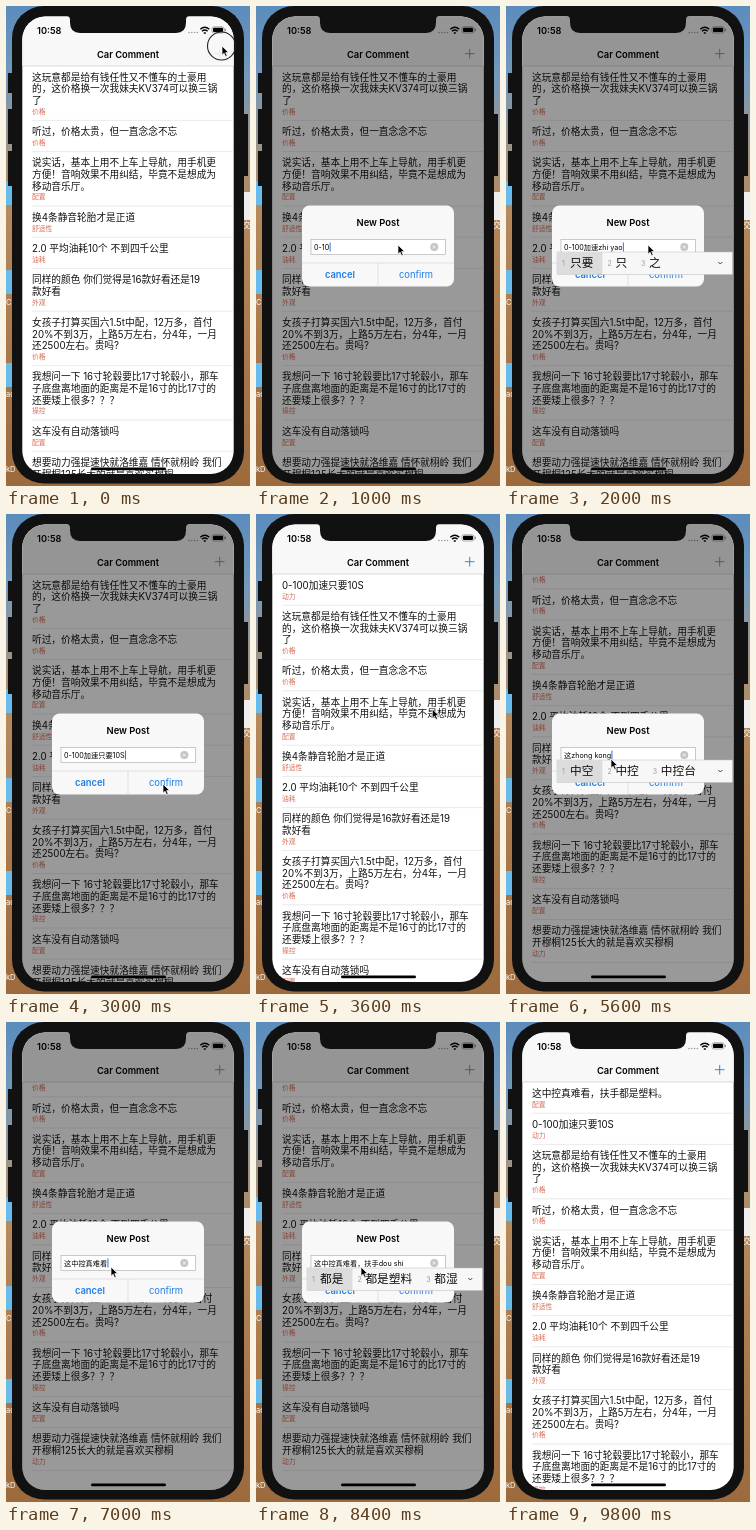
An HTML page that plays this animation: 244x480 px, repeating every 10 s.

```html
<!DOCTYPE html>
<html lang="zh-CN">
<head>
<meta charset="utf-8">
<title>Car Comment</title>
<style>
html, body { margin: 0; width: 100%; height: 100%; overflow: hidden; background: #000; }
svg { display: block; width: 100vw; height: 100vh; }
text { font-family: Inter, "Noto Sans CJK SC", "Noto Sans CJK", sans-serif; white-space: pre; }
</style>
</head>
<body>
<svg viewBox="0 0 244 480">
  <defs>
    <linearGradient id="desert" x2="0" y2="1">
      <stop offset="0" stop-color="#5b8cbc"/>
      <stop offset=".15" stop-color="#7499bb"/>
      <stop offset=".28" stop-color="#9a948c"/>
      <stop offset=".42" stop-color="#b58a5e"/>
      <stop offset=".7" stop-color="#ab7a4a"/>
      <stop offset="1" stop-color="#9c6a3c"/>
    </linearGradient>
    <clipPath id="screen"><rect x="16.3" y="10.5" width="211.4" height="457.5" rx="23"/></clipPath>
    <clipPath id="table"><rect x="16" y="60" width="212" height="409"/></clipPath>
  </defs>

  <!-- desktop -->
  <rect width="244" height="480" fill="url(#desert)"/>
  <g fill="#68bbea">
    <rect x="-8" y="175" width="15" height="24" rx="2"/>
    <rect x="-8" y="264" width="15" height="24" rx="2"/>
    <rect x="-8" y="357" width="15" height="24" rx="2"/>
  </g>
  <rect x="235" y="186" width="12" height="28" fill="#eee"/>
  <g fill="#fff" font-size="7.5">
    <text x="0" y="299">C</text><text x="0" y="391">ad</text>
    <text x="0" y="466">kD</text><text x="237" y="222">交</text>
  </g>

  <!-- phone -->
  <g fill="#121112">
    <path d="M2 67h6v20h-6zM2 103h6v35h-6zM2 145h6v35h-6zM236 108h6v62h-6z"/>
    <rect x="6" y="0" width="232" height="477.5" rx="32"/>
  </g>
  <g clip-path="url(#screen)">
    <rect x="16" y="10" width="212" height="459" fill="#fff"/>
    <g clip-path="url(#table)"><g id="rows"></g></g>
    <rect x="16" y="10" width="212" height="50" fill="#f8f8f8"/>
    <path d="M16 60h212" stroke="#b5b5b8" stroke-width=".5"/>
    <text x="122" y="51.5" font-size="9.3" font-weight="600" text-anchor="middle">Car Comment</text>
    <path id="plus" d="M208.9 47.7h9.6M213.7 42.9v9.6" stroke-width=".9"/>
    <text x="31" y="27.5" font-size="9.2" font-weight="600">10:58</text>
    <g fill="#999">
      <circle cx="183" cy="26.5" r=".8"/><circle cx="185.8" cy="26.5" r=".8"/>
      <circle cx="188.6" cy="26.5" r=".8"/><circle cx="191.4" cy="26.5" r=".8"/>
    </g>
    <path d="M194.3 23.2q4.5-4 9 0M196 25.2q2.8-2.4 5.6 0M197.8 27h2" fill="none" stroke="#000" stroke-width="1.4"/>
    <rect x="206" y="20.8" width="12" height="6.2" rx="1.8" fill="none" stroke="#777" stroke-width=".6"/>
    <rect x="207" y="21.8" width="10" height="4.2" rx="1"/>
    <path d="M219.2 22.7v2.4" stroke="#777"/>
    <rect x="85" y="461.5" width="75" height="2.8" rx="1.4"/>
    <rect id="dim" x="16" y="10" width="212" height="459"/>
  </g>
  <path d="M60.5 10q3.5 0 3.5 4v2.5q0 10.5 10 10.5h96q10 0 10-10.5v-2.5q0-4 3.5-4z" fill="#121112"/>

  <!-- alert -->
  <g id="alert">
    <rect x="46" y="199.5" width="152" height="81" rx="7.5" fill="#f8f8f8"/>
    <text x="122" y="219.5" font-size="9.4" font-weight="600" text-anchor="middle">New Post</text>
    <rect x="55" y="233.5" width="134.5" height="15" fill="#fff" stroke="#b4b4b4" stroke-width=".7"/>
    <text id="entry" x="58" y="243.6" font-size="7.2"></text>
    <path id="caret" stroke="#2f6fe8" stroke-width="1"/>
    <g id="clear">
      <circle cx="178.3" cy="241" r="4" fill="#c4c4c7"/>
      <path d="M176.8 239.5l3 3m0-3l-3 3" stroke="#fff" stroke-width=".8"/>
    </g>
    <path d="M46 257h152M122 257v23.5" stroke="#d2d2d5" stroke-width=".6"/>
    <g font-size="9.4" fill="#1b7de8" text-anchor="middle">
      <text x="84" y="271.5" font-weight="600">cancel</text>
      <text x="160" y="271.5">confirm</text>
    </g>
  </g>
  <g id="candidates"></g>

  <g id="pointer">
    <circle id="press" cx="-.5" cy="0" r="14" fill="none" stroke="#222" stroke-width="1.1"/>
    <path d="M0 0v9.2l2.1-2 1.5 3.4 1.6-.7-1.5-3.3h2.9z" stroke="#fff" stroke-width=".7"/>
  </g>
</svg>
<script>
const LOOP = 10000, STEP = 200, TABLE_TOP = 60, LINE = 11.6;
const $ = id => document.getElementById(id);

const comments = [
  ['价格', '这玩意都是给有钱任性又不懂车的土豪用', '的，这价格换一次我妹夫KV374可以换三锅', '了'],
  ['价格', '听过，价格太贵，但一直念念不忘'],
  ['配置', '说实话，基本上用不上车上导航，用手机更', '方便！音响效果不用纠结，毕竟不是想成为', '移动音乐厅。'],
  ['舒适性', '换4条静音轮胎才是正道'],
  ['油耗', '2.0 平均油耗10个 不到四千公里'],
  ['外观', '同样的颜色 你们觉得是16款好看还是19', '款好看'],
  ['价格', '女孩子打算买国六1.5t中配，12万多，首付', '20%不到3万，上路5万左右，分4年，一月', '还2500左右。贵吗?'],
  ['操控', '我想问一下 16寸轮毂要比17寸轮毂小，那车', '子底盘离地面的距离是不是16寸的比17寸的', '还要矮上很多？？？'],
  ['配置', '这车没有自动落锁吗'],
  ['动力', '想要动力强提速快就洛维嘉 情怀就栩岭 我们', '开穆桐125长大的就是喜欢买穆桐']
];
const posts = [
  { at: 3600, row: ['动力', '0-100加速只要10S'] },
  { at: 9400, row: ['配置', '这中控真难看，扶手都是塑料。'] }
];

// [time, field text, input-method candidates]
const typing = [
  [0, ''], [600, '0'], [800, '0-1'], [1000, '0-10'], [1200, '0-100'],
  [1400, '0-100jia', '加 家 价'], [1600, '0-100jia su', '加速 家 价'], [1800, '0-100加速'],
  [2000, '0-100加速zhi yao', '只要 只 之'], [2200, '0-100加速只要'],
  [2400, '0-100加速只要1'], [2600, '0-100加速只要10S'],
  [3600, ''], [4800, 'zhe', '这 着 者'], [5000, '这'], [5200, '这zhong', '中 种 重'],
  [5400, '这zhong ko', '中空 中控 中'], [5600, '这zhong kong', '中空 中控 中控台'],
  [6000, '这中控'], [6200, '这中控zhen', '真 阵 镇'], [6400, '这中控真'],
  [6600, '这中控真nan', '难 男 南'], [6800, '这中控真nan kan', '难看 难堪 男'],
  [7000, '这中控真难看'], [7200, '这中控真难看，'], [7400, '这中控真难看，fu', '副 付 扶'],
  [7600, '这中控真难看，fu shou', '扶手 副手 俯首'], [8000, '这中控真难看，扶手'],
  [8200, '这中控真难看，扶手dou', '都 斗 豆'], [8400, '这中控真难看，扶手dou shi', '都是 都是塑料 都湿'],
  [8600, '这中控真难看，扶手都是塑料'], [8800, '这中控真难看，扶手都是塑料。']
];

// Keyframes: [time, value]
const alertLevel = [[0, 0], [200, .4], [400, 1], [3200, 1], [3400, .4], [3600, 0], [4000, 0],
  [4200, .4], [4400, 1], [9000, 1], [9200, .4], [9400, 0]];
const alertScale = [[0, 1.26], [400, 1], [3600, 1], [4000, 1.26], [4400, 1]];
const plusOpacity = [[0, .1], [400, 1], [3800, 1], [4000, .1], [4400, 1]];
const scrollY = [[3600, 0], [4000, 70.8], [9200, 70.8], [9400, 60], [9800, 0]];
const pointerX = [[200, 216], [800, 142], [2400, 142], [2800, 157], [3400, 157], [4000, 215],
  [4400, 215], [5000, 105], [8600, 105], [9000, 157]];
const pointerY = [[200, 40], [800, 239], [2400, 239], [2800, 270], [3400, 270], [4000, 45],
  [4400, 45], [5000, 245], [8600, 245], [9000, 270]];

function track(keys, t) {
  const next = keys.findIndex(key => key[0] > t);
  if (next === 0) return keys[0][1];
  if (next < 0) return keys[keys.length - 1][1];
  const [t0, a] = keys[next - 1], [t1, b] = keys[next];
  return a + (b - a) * (t - t0) / (t1 - t0);
}

const label = (x, y, size, fill, content) =>
  `<text x="${x}" y="${y}" font-size="${size}" fill="${fill}">${content}</text>`;

function drawRows(t) {
  let top = TABLE_TOP, out = '';
  const added = posts.filter(post => t >= post.at).map(post => post.row).reverse();
  for (const [tag, ...lines] of [...added, ...comments]) {
    const height = 19.6 + LINE * lines.length;
    lines.forEach((line, i) => out += label(26, top + 14.8 + i * LINE, 9.7, '#111', line));
    out += label(26, top + height - 6.7, 6.8, '#d66c55', tag);
    out += `<path d="M26 ${top + height}h202" stroke="#d0d0d3" stroke-width=".45"/>`;
    top += height;
  }
  $('rows').innerHTML = out;
  $('rows').setAttribute('transform', `translate(0 ${-track(scrollY, t)})`);
}

function drawCandidates(words) {
  if (!words) return $('candidates').innerHTML = '';
  let x = 56, out = '';
  words.split(' ').forEach((word, i) => {
    const width = word.length * 11.7;
    if (!i) out += `<rect x="51" y="246" width="${width + 22}" height="22" fill="#dcdcdc"/>`;
    out += label(x, 260, 7, '#999', i + 1) + label(x + 8, 261.2, 11.7, '#111', word);
    x += width + 22;
  });
  $('candidates').innerHTML =
    `<rect x="51" y="246" width="175.5" height="22.5" fill="#f7f7f7" stroke="#bbb" stroke-width=".5"/>
     ${out}<path d="M212.3 256l2 2 2-2" fill="none" stroke="#444"/>`;
}

function drawAlert(t, level) {
  const [, text, words] = typing.filter(entry => entry[0] <= t).pop();
  $('alert').setAttribute('opacity', level ** .6);
  $('alert').setAttribute('transform',
    `translate(122 240) scale(${track(alertScale, t)}) translate(-122 -240)`);
  $('dim').setAttribute('opacity', level * .4);
  $('entry').textContent = text;
  const end = 58.8 + (text ? $('entry').getComputedTextLength() : 0);
  $('caret').setAttribute('d', `M${end} 236.5v9`);
  $('caret').setAttribute('opacity', level === 1 && t % 1200 >= 400 ? 1 : 0);
  $('clear').setAttribute('opacity', text ? 1 : 0);
  drawCandidates(words);
}

function draw(t) {
  const level = track(alertLevel, t), pressed = t === 0 || t === 4000;
  drawRows(t);
  drawAlert(t, level);
  $('plus').setAttribute('stroke', level === 1 ? '#888' : '#1a80d8');
  $('plus').setAttribute('opacity', track(plusOpacity, t));
  $('press').setAttribute('opacity', pressed ? 1 : 0);
  $('pointer').setAttribute('opacity', t < 9600 ? 1 : 0);
  $('pointer').setAttribute('transform', `translate(${track(pointerX, t)} ${track(pointerY, t)})`);
}

const start = performance.now();
let shown = -1;
function tick() {
  const t = Math.floor((performance.now() - start) % LOOP / STEP) * STEP;
  if (t !== shown) draw(shown = t);
  requestAnimationFrame(tick);
}
tick();
</script>
</body>
</html>
```
